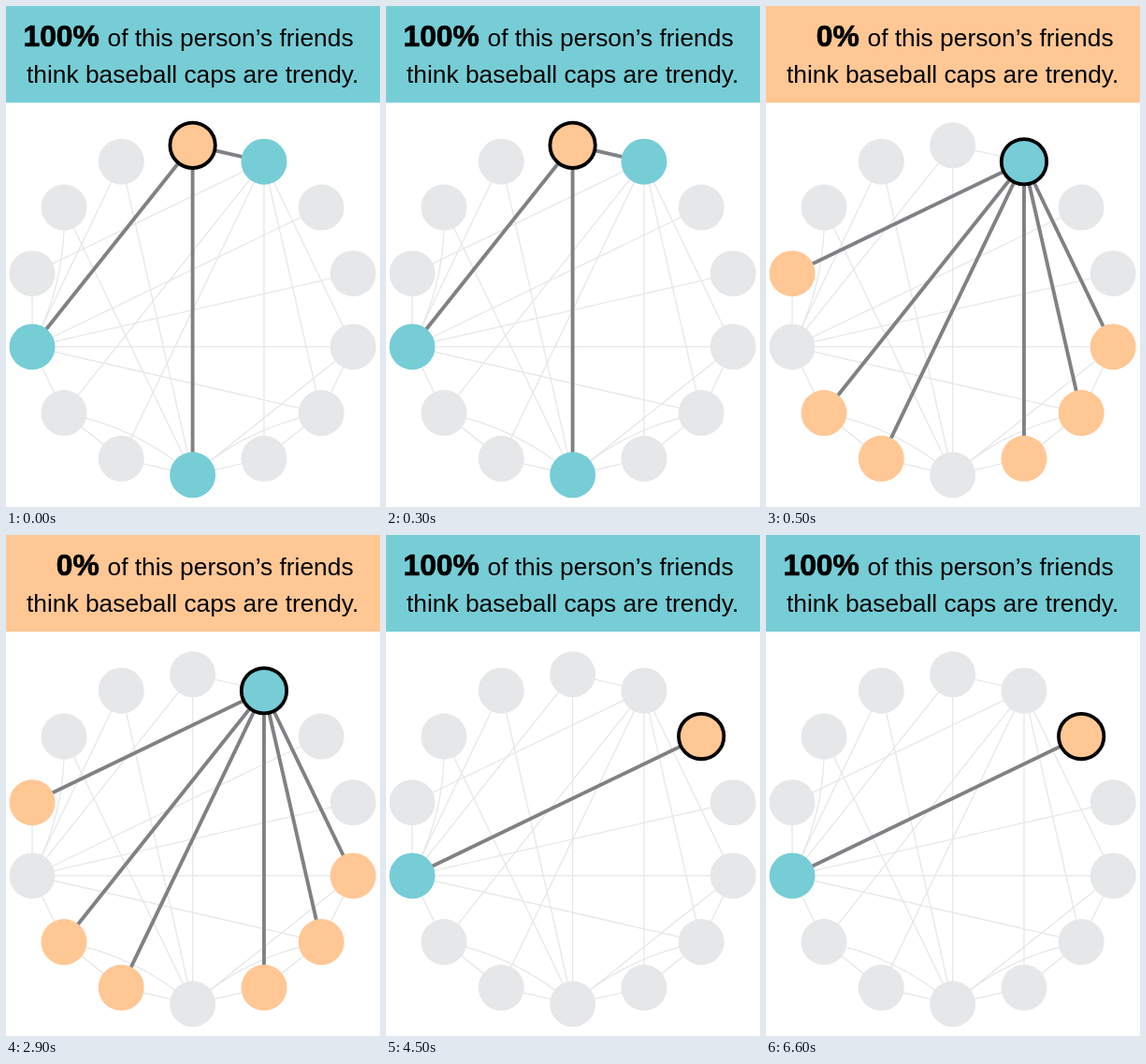
Animation, 400 px wide and 535 px high, one loop 8 s. Source, as an HTML page:

```html
<!DOCTYPE html>
<html lang="en">
<head>
<meta charset="utf-8">
<title>Trendy friends network</title>
<style>
  html, body { margin: 0; width: 100%; height: 100%; overflow: hidden; background: #fff; }
  svg { display: block; width: 100vw; height: 100vh; }
  text { font: 26.35px "Liberation Sans", Arial, sans-serif; fill: #000; }
  #percent { font-size: 31.8px; font-weight: bold; text-anchor: end; stroke: #000; stroke-width: .7; }
</style>
</head>
<body>
<svg viewBox="0 0 400 535">
  <rect id="banner" width="400" height="103.3"/>
  <text id="percent" x="99.8" y="42.5"></text>
  <text x="108.5" y="42.5">of this person’s friends</text>
  <text x="22" y="82">think baseball caps are trendy.</text>
  <g id="edges" fill="none"></g>
  <g id="nodes"></g>
</svg>
<script>
const TEAL = '#76cdd6', ORANGE = '#ffc794', GREY = '#e6e7e8', DARK = '#808184';
const LOOP = 8000;
const COUNT = 14, CX = 199.6, CY = 324.8, RADIUS = 176;
const BEND = 0.87;

// People are numbered clockwise from the top.
const friends = {
  0: [1, 7, 10],
  1: [4, 5, 6, 8, 9, 11],
  2: [10],
  5: [4, 6],
  7: [4, 5, 6, 8, 9, 12, 13],
  8: [9],
  10: [3, 4, 5, 9, 11, 12, 13]
};
const capFans = [1, 7, 10];
const scenes = [
  { start: 0, person: 0 },
  { start: 500, person: 1 },
  { start: 4500, person: 2 }
];

const byId = id => document.getElementById(id);

function set(el, attrs) {
  for (const key in attrs) el.setAttribute(key, attrs[key]);
}

function add(parent, tag, attrs) {
  const el = document.createElementNS('http://www.w3.org/2000/svg', tag);
  set(el, attrs);
  return parent.appendChild(el);
}

function place(i) {
  const angle = 2 * Math.PI * i / COUNT;
  return [CX + RADIUS * Math.sin(angle), CY - RADIUS * Math.cos(angle)];
}

// Links that skip one neighbour bend inwards to pass around it.
function linkPath(a, b) {
  const [x1, y1] = place(a), [x2, y2] = place(b);
  const pull = Math.abs(a - b) === 2 ? BEND : 1;
  const cx = CX + pull * ((x1 + x2) / 2 - CX);
  const cy = CY + pull * ((y1 + y2) / 2 - CY);
  return `M${x1} ${y1}Q${cx} ${cy} ${x2} ${y2}`;
}

const edges = Object.keys(friends).map(Number).flatMap(from =>
  friends[from].map(to => ({
    from, to, el: add(byId('edges'), 'path', { d: linkPath(from, to) })
  })));

const nodes = Array.from({ length: COUNT }, (_, i) => {
  const [cx, cy] = place(i);
  return add(byId('nodes'), 'circle', { cx, cy, r: 24.5 });
});

const opinion = i => capFans.includes(i) ? TEAL : ORANGE;

function show(person) {
  const circle = friends[person];
  const share = circle.filter(i => capFans.includes(i)).length / circle.length;
  byId('percent').textContent = `${Math.round(100 * share)}%`;
  byId('banner').setAttribute('fill', share > 0.5 ? TEAL : ORANGE);

  for (const { from, el } of edges) {
    const active = from === person;
    set(el, { stroke: active ? DARK : GREY, 'stroke-width': active ? 3.9 : 1.3 });
    if (active) el.parentNode.appendChild(el);
  }

  nodes.forEach((el, i) => {
    const chosen = i === person;
    set(el, {
      fill: chosen || circle.includes(i) ? opinion(i) : GREY,
      stroke: chosen ? '#000' : 'none',
      'stroke-width': 3.8,
      r: chosen ? 24.2 : 24.5
    });
  });
}

let current;
function render(time) {
  const t = time % LOOP;
  const { person } = scenes.findLast(scene => scene.start <= t);
  if (person !== current) show(current = person);
}

const origin = performance.now();
function tick() {
  render(performance.now() - origin);
  requestAnimationFrame(tick);
}
tick();
</script>
</body>
</html>
```
